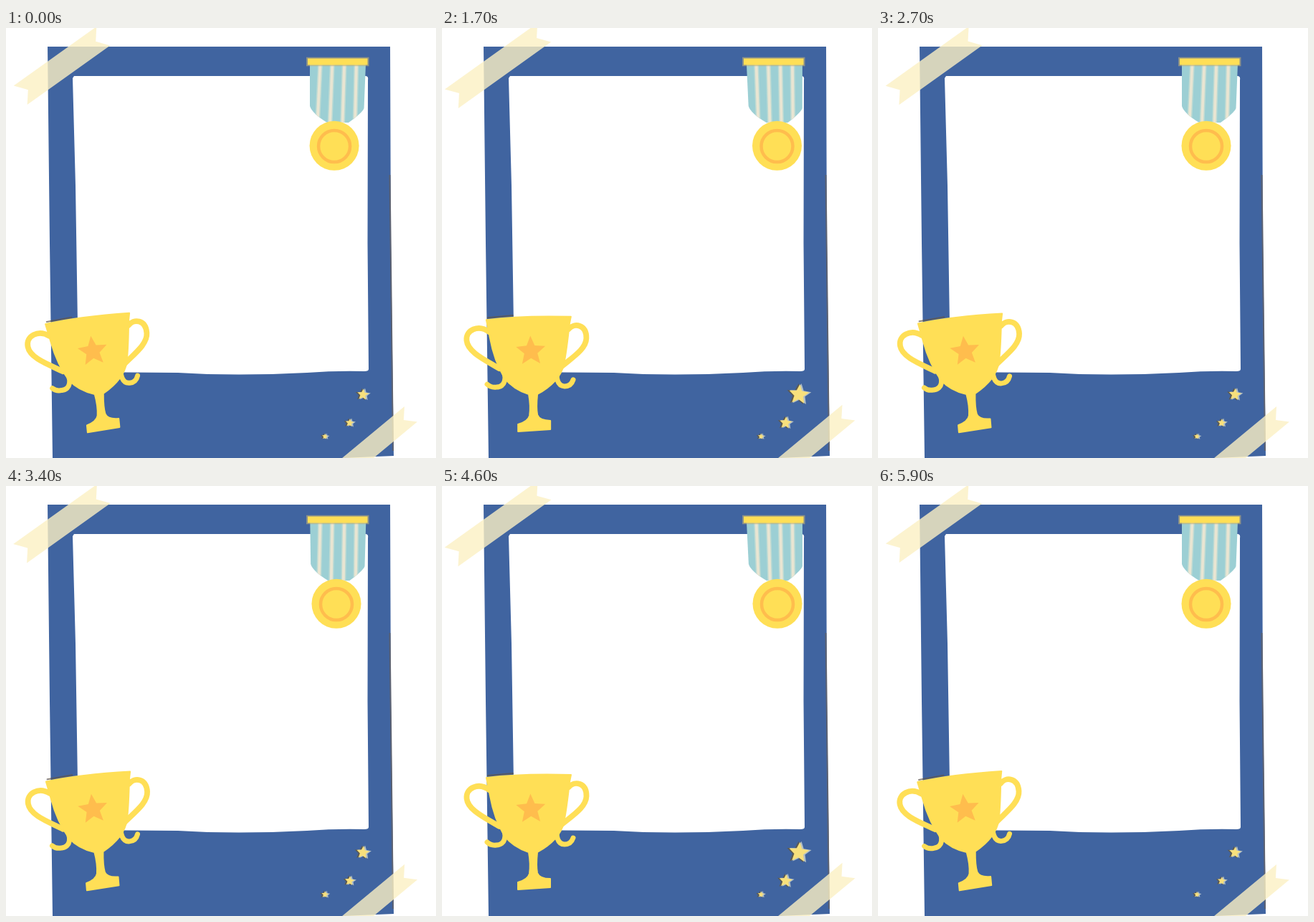
Animation of 600x600 px, one loop 6 s. Source, as an HTML page with a canvas:

```html
<!DOCTYPE html>
<html lang="en">
<head>
<meta charset="utf-8">
<title>Award photo frame</title>
<style>
  html, body { margin: 0; width: 100%; height: 100%; overflow: hidden; background: #fff; }
  canvas { display: block; width: 600px; height: 600px; }
</style>
</head>
<body>
<canvas id="stage" width="600" height="600"></canvas>
<script>
const ctx = document.getElementById('stage').getContext('2d');
const PERIOD = 3000, STEP = 100;
const BLUE = '#4064a0', GOLD = '#ffdf56', ORANGE = '#ffbd4d', TAPE = 'rgba(252,240,196,.8)';

const mix = (a, b, u) => a + (b - a) * u;
const smooth = u => u * u * (3 - 2 * u);
// 0..1 swing that is highest at the given moment of the period
const swing = (t, peak) => 0.5 + 0.5 * Math.cos((t - peak) / PERIOD * 2 * Math.PI);

function fill(path, color) {
  ctx.fillStyle = color;
  ctx.fill(new Path2D(path));
}

function stroke(path, color, width) {
  ctx.strokeStyle = color;
  ctx.lineWidth = width;
  ctx.stroke(new Path2D(path));
}

function circle(x, y, r) {
  const path = new Path2D();
  path.arc(x, y, r, 0, 2 * Math.PI);
  return path;
}

function star(x, y, r, color, turn) {
  ctx.beginPath();
  for (let i = 0; i < 10; i++) {
    const angle = turn - Math.PI / 2 + i * Math.PI / 5;
    const d = i % 2 ? r * 0.45 : r;
    ctx.lineTo(x + d * Math.cos(angle), y + d * Math.sin(angle));
  }
  ctx.fillStyle = color;
  ctx.fill();
}

function frame() {
  fill('M58 26 H536 L537 300 L541 597 L470 600 H65 L61 300Z', BLUE);
  stroke('M535.5 205 L537 330 L540 590', '#5c6272', 2);
  fill('M95 67 H502 Q506 67 505 73 L504.5 300 L506 476 Q506 479 500 479 ' +
       'Q460 478 420 481 Q320 486 240 481 L101 480 L97 220 L93 70Z', '#fff');
}

// A strip with a notch cut into both ends
function tape(x, y, length, width, angle) {
  const l = length / 2, w = width / 2, notch = 13;
  ctx.save();
  ctx.translate(x, y);
  ctx.rotate(angle);
  fill(`M${-l} ${-w} L${notch - l} 0 L${-l} ${w} H${l} L${l - notch} 0 L${l} ${-w}Z`, TAPE);
  ctx.restore();
}

function tapes(t) {
  const u = swing(t, 1500) ** 1.4;
  tape(78, 52.5, mix(142, 160, u), 32.5, -0.62);
  tape(491, 600, mix(192, 199, u), 28, -0.692);
}

function medal(t) {
  const u = smooth(swing(t, 1290));
  const x = mix(458, 468.3, u), neck = mix(463, 468, u);
  const left = mix(424, 428, u), right = mix(499.5, 503, u);

  ctx.save();
  ctx.clip(new Path2D(`M${424 + u} 50 H${502 + u} L${right} 112 Q${right - 2} 118 ${neck + 15} 132 ` +
    `H${neck - 15} Q${left + 3} 119 ${left} 109Z`));
  ctx.fillStyle = '#9ccfd4';
  ctx.fillRect(410, 40, 110, 100);
  for (let i = 0; i < 4; i++) {
    const foot = mix(434.5 + 17.5 * i, 442 + 16 * i, u);
    const stripe = `M${438.5 + 16.8 * i} 50 L${foot} 134`;
    stroke(stripe, '#bddad3', 7);
    stroke(stripe, '#e9e5d2', 3.8);
  }
  ctx.restore();

  stroke('M419 47 H506.5', 'rgba(190,175,120,.6)', 12.5);
  stroke('M421 47 H504.5', GOLD, 9);

  ctx.fillStyle = GOLD;
  ctx.fill(circle(x, 164.3, 34.5));
  ctx.strokeStyle = ORANGE;
  ctx.lineWidth = 4.5;
  ctx.stroke(circle(x, 165, 22));
}

function trophy(t) {
  ctx.save();
  ctx.translate(123, 482);
  ctx.rotate(-0.097 * (1 - swing(t, 1550)));
  ctx.translate(-123, -482);
  ctx.lineCap = ctx.lineJoin = 'round';
  stroke('M64 404 L99 401', 'rgba(95,85,75,.7)', 2);

  // handles, then the curls below them
  stroke('M66 424 C51 413 33 421 34.5 436 C36 452 60 463 80 475', GOLD, 7.8);
  stroke('M177 420 C185 411 202 414 201.5 433 C201 449 180 461 165 474', GOLD, 7.8);
  stroke('M83 474 C92 487 88 501 76 501 Q68 502 63 497', GOLD, 7);
  stroke('M162 476 C158 487 161 500 171 500 Q180 500 183 491', GOLD, 7);

  const cup = 'M62 407 Q110 401 180 403 L178 413 Q174 450 170 470 Q164 494 133 511 ' +
    'Q131 530 133 540 Q136 548 151 548 L151 560 L106 563 L106 553 ' +
    'Q120 549 122 541 Q124 528 121 511 Q99 504 87 488 Q73 465 67 432Z';
  fill(cup, GOLD);
  stroke(cup, GOLD, 2);
  star(124, 451, 21.5, ORANGE, -0.03);
  ctx.restore();
}

function sparkle(x, y, r) {
  star(x - 2, y, r, '#5d5b52', 0.1);
  star(x + 2, y, r, '#b4c0c6', 0.1);
  star(x, y, r * 0.93, '#f8e07c', 0.1);
}

function draw(t) {
  ctx.fillStyle = '#fff';
  ctx.fillRect(0, 0, 600, 600);
  frame();
  tapes(t);
  medal(t);
  trophy(t);
  sparkle(498, 511.5, mix(9, 16, swing(t, 1500)));
  sparkle(479.5, 551, mix(6.5, 12, swing(t, 1200) ** 2));
  sparkle(445, 570, mix(4.5, 8.3, swing(t, 950) ** 4));
}

const start = performance.now();
function tick() {
  const t = performance.now() - start;
  draw(Math.floor(t / STEP) * STEP % PERIOD);
  requestAnimationFrame(tick);
}
tick();
</script>
</body>
</html>
```
